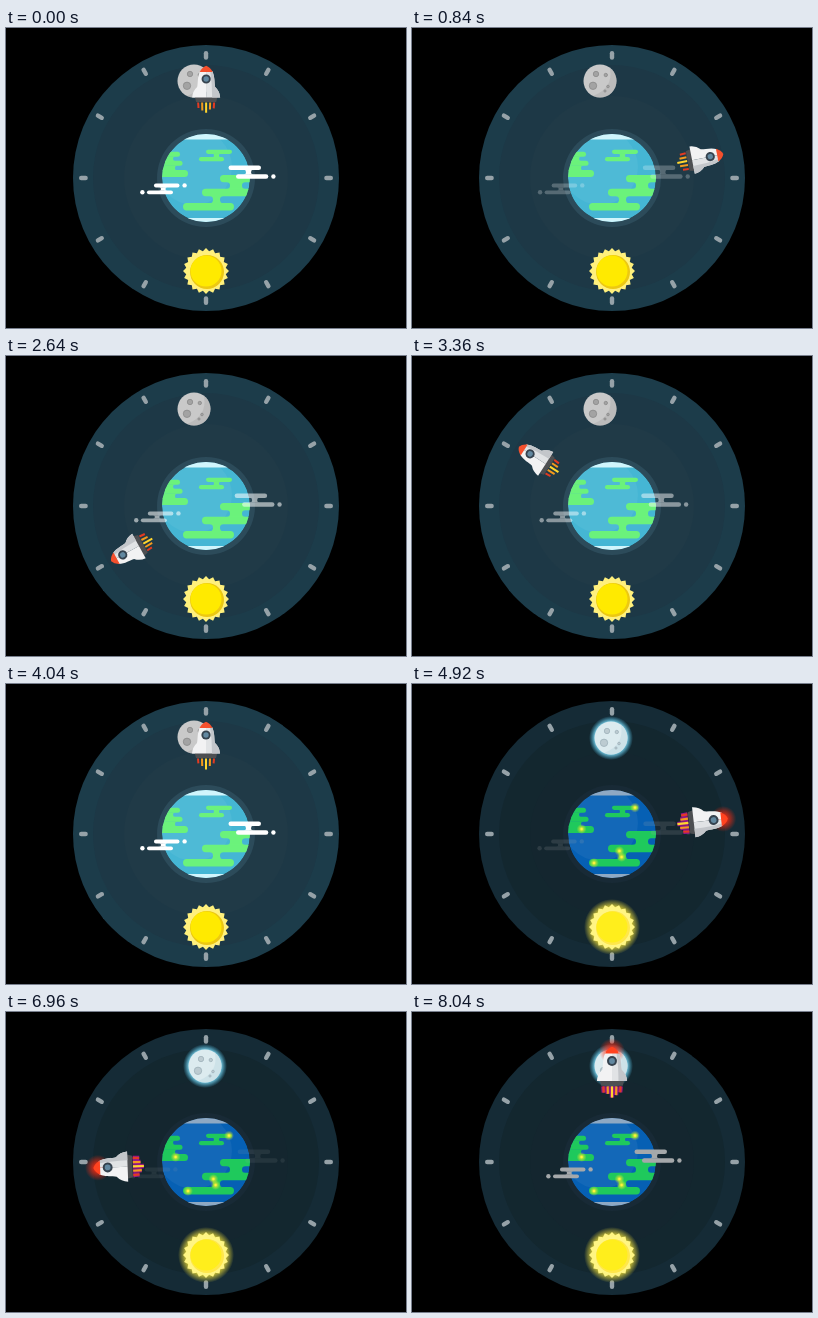
An HTML page for the animation above (8120 ms loop, 400 by 300 pixels).

```html
<!DOCTYPE html>
<html lang="en">
<head>
<meta charset="utf-8">
<title>Day and night orbit</title>
<style>
html, body { margin: 0; width: 100%; height: 100%; overflow: hidden; background: #000; }
svg {
  display: block; width: 100vw; height: 100vh;
  --rim: #1c3c4a; --mid: #1d3846; --core: #203a47; --halo: #2c4b5a;
  --sea: #45b6d4; --land: #6bf27b; --pole: #d0f5fc; --cloud: #fff;
  --ray: #fff07c; --sun: #ffea00; --sunShade: #ecc812;
  --moon: #c9c9c9; --moonShade: #b3b3b3; --crater: #a3a3a3; --craterRim: #8b8b8b;
  --nose: #f4502d;
}
svg.night {
  --rim: #152b36; --mid: #13272f; --core: #14262f; --halo: #182a36;
  --sea: #0660b4; --land: #1fc95c; --pole: #8fa9c3; --cloud: #a5a8aa;
  --ray: #fff583; --sun: #ffee1c; --sunShade: #ffe74a;
  --moon: #dcebef; --moonShade: #c4dde5; --crater: #bccbd1; --craterRim: #9fb2ba;
  --nose: #ff4320;
}
.dark { display: none; }
.night .dark { display: inline; }
.land { fill: var(--land); }
.cloud { fill: var(--cloud); }
</style>
</head>
<body>
<svg id="stage" viewBox="0 0 400 300" xmlns="http://www.w3.org/2000/svg">
  <defs>
    <clipPath id="globe"><circle cx="200" cy="150" r="44"/></clipPath>
    <clipPath id="moonDisc"><circle r="16.5"/></clipPath>
    <radialGradient id="sunGlow">
      <stop offset=".72" stop-color="#ffec3a" stop-opacity=".75"/>
      <stop offset="1" stop-color="#ffec3a" stop-opacity="0"/>
    </radialGradient>
    <radialGradient id="moonGlow">
      <stop offset=".7" stop-color="#8fe6ff" stop-opacity=".95"/>
      <stop offset="1" stop-color="#4cc4ee" stop-opacity="0"/>
    </radialGradient>
    <radialGradient id="noseGlow">
      <stop offset=".3" stop-color="#ff2a10" stop-opacity=".8"/>
      <stop offset="1" stop-color="#ff2a10" stop-opacity="0"/>
    </radialGradient>
    <radialGradient id="cityGlow">
      <stop offset=".15" stop-color="#fff23c"/>
      <stop offset=".4" stop-color="#e4e82c" stop-opacity=".65"/>
      <stop offset="1" stop-color="#c8e82c" stop-opacity="0"/>
    </radialGradient>
  </defs>
  <rect width="400" height="300"/>
  <circle cx="200" cy="150" r="133" fill="var(--rim)"/>
  <circle cx="200" cy="150" r="113" fill="var(--mid)"/>
  <circle cx="200" cy="150" r="82" fill="var(--core)"/>
  <g id="ticks" stroke="#96a2a8" stroke-width="4.4" stroke-linecap="round"/></g>
  <circle cx="200" cy="150" r="49" fill="var(--halo)"/>
  <g clip-path="url(#globe)">
    <circle cx="200" cy="150" r="44" fill="var(--sea)"/>
    <circle cx="188" cy="139" r="38" fill="#fff" opacity=".05"/>
    <path d="M150 100H250V111.5H150ZM150 190H250V200H150Z" fill="var(--pole)"/>
    <g id="lands" class="land"></g>
  </g>
  <g id="cities" class="dark"></g>
  <g id="cloudRight" class="cloud"></g>
  <g id="cloudLeft" class="cloud"></g>
  <g transform="translate(200 243)">
    <circle class="dark" r="28" fill="url(#sunGlow)"/>
    <path id="rays" fill="var(--ray)"/>
    <circle cx="1" cy="1" r="17" fill="var(--sunShade)"/>
    <circle r="15.5" fill="var(--sun)"/>
  </g>
  <g id="moon">
    <circle class="dark" r="22" fill="url(#moonGlow)"/>
    <circle r="16.5" fill="var(--moon)"/>
    <path d="M9-17Q16 8-10 16L0 22L22 14L20-12Z" fill="var(--moonShade)" opacity=".6" clip-path="url(#moonDisc)"/>
    <g id="craters" fill="var(--crater)" stroke="var(--craterRim)" stroke-width=".8"></g>
  </g>
  <g id="rocket">
    <g id="flames" stroke-width="2"></g>
    <circle class="dark" cy="-9" r="12" fill="url(#noseGlow)"/>
    <path d="M-11.5 17H11.5L10 23H-10Z" fill="#4d4f52"/>
    <path d="M-6-8C-9-2-8 4-9 8Q-13.5 12-14 18.5H0V-8Z" fill="#f2f2f3"/>
    <path d="M6-8C9-2 8 4 9 8Q13.5 12 14 18.5H0V-8Z" fill="#e1e3e5"/>
    <path d="M4-8H6C9-2 8 4 9 8Q13.5 12 14 18.5H6Q6 4 4-8Z" fill="#c3c6ca"/>
    <path d="M-6.5-7Q-4-12 0-13.3Q4-12 6.5-7Z" fill="var(--nose)"/>
    <circle r="4.6" fill="#35424e"/>
    <circle r="2.7" fill="#6288a0"/>
  </g>
</svg>
<script>
const LOOP = 8120, NIGHT_AT = 4060, NIGHT_ORIGIN = 4040;
const el = id => document.getElementById(id);
const stage = el('stage');
const clamp = (v, lo, hi) => Math.min(hi, Math.max(lo, v));

const bar = (x1, x2, y, h) =>
  `<rect x="${x1}" y="${y}" width="${x2 - x1}" height="${h}" rx="${h / 2}"/>`;
const neck = (x1, x2, y1, y2) => {
  const r = (y2 - y1) / 2, w = x2 - x1;
  return `<path d="M${x1 - r} ${y1}H${x2 + r}a${r} ${r} 0 0 0 0 ${2 * r}H${x1 - r}a${r} ${r} 0 0 0 0 ${-2 * r}Z"/>`;
};
const dot = (x, y, r, extra = '') => `<circle cx="${x}" cy="${y}" r="${r}" ${extra}/>`;

el('ticks').innerHTML = Array.from({ length: 12 }, (_, i) =>
  `<path d="M200 25.2V29.6" transform="rotate(${i * 30} 200 150)"/>`).join('');

el('lands').innerHTML = [
  bar(200, 226, 121.7, 4.3), neck(208, 213, 125.6, 129.4), bar(193, 218, 129, 4.3),
  bar(150, 174, 123.8, 5), neck(150, 167, 128.4, 133.2), bar(150, 176.5, 132.8, 5),
  neck(150, 169, 137.4, 142.4), bar(150, 182, 142, 7),
  bar(214, 256, 147, 7.2), neck(224, 236, 154, 161), bar(196, 250, 160.8, 7.4),
  neck(207, 214, 168, 175.4), bar(177, 228, 175, 7.4)
].join('');

el('cities').innerHTML = [[223, 123.6], [169.6, 145], [207.4, 167], [209.6, 173], [182, 179]]
  .map(([x, y]) => dot(x, y, 5, 'fill="url(#cityGlow)"')).join('');

el('cloudRight').innerHTML = bar(222.5, 255, 137.4, 4.6) + neck(240, 245, 141.8, 146.6) +
  bar(230, 262.3, 146.3, 4.5) + dot(267.4, 148.5, 2.2);
el('cloudLeft').innerHTML = bar(148, 173.5, 155.6, 3.8) + neck(155, 159.5, 159.2, 162.7) +
  bar(141, 167, 162.4, 3.8) + dot(178.6, 157.4, 2.2) + dot(136.4, 164.2, 2.2);

el('craters').innerHTML = [[-7, 4.8, 3.7], [-4, -7, 2.7], [5.8, -6, 1.7], [8, 5.5, 1.3], [5, 10, 1.1]]
  .map(c => dot(...c)).join('');

const RAYS = 20;
el('rays').setAttribute('d', 'M' + Array.from({ length: RAYS * 2 }, (_, i) => {
  const a = Math.PI * i / RAYS, r = i % 2 ? 20 : 23;
  return `${(r * Math.sin(a)).toFixed(2)} ${(-r * Math.cos(a)).toFixed(2)}`;
}).join('L') + 'Z');

const FLAMES = [[-8, 5, '#e33b22'], [-4, 7, '#f39a1d'], [0, 10, '#ffd62e'], [4, 7, '#f39a1d'], [8, 5, '#e33b22']];

function drawFlames(time, night) {
  const step = Math.floor(time / 80);
  el('flames').innerHTML = FLAMES.map(([x, len, color], i) => {
    const end = 24 + len + .6 * Math.sin(step * 2.1 + i * 1.7);
    const line = (stroke, width) =>
      `<path d="M${x} 23.5L${x * .95} ${end}" stroke="${stroke}" stroke-width="${width}"/>`;
    return (night ? line('#9a1787', 4) : '') + line(color, 2);
  }).join('');
}

function render(time) {
  const night = time >= NIGHT_AT;
  const u = night ? Math.min(1, (time - NIGHT_ORIGIN) / 4000) : Math.min(1, time / 4040);
  stage.classList.toggle('night', night);
  el('moon').setAttribute('transform', `translate(${night ? 199 : 188} ${night ? 54 : 53})`);

  // Clouds drift apart and return twice per turn, fading as they go.
  const drift = 1 - Math.abs(1 - (u * 4) % 2);
  const opacity = clamp(1.45 - 1.45 * drift, 0, 1);
  for (const [id, dir] of [['cloudRight', 1], ['cloudLeft', -1]]) {
    el(id).setAttribute('transform', `translate(${dir * 10 * drift} 0)`);
    el(id).setAttribute('opacity', opacity);
  }

  const angle = 360 * u + 6.5 * Math.sin(Math.PI * u);
  const [radius, scale] = night ? [100.5, 1.08] : [98.5, 1];
  el('rocket').setAttribute('transform',
    `translate(202 149.5) rotate(${angle}) translate(-2 ${-radius}) scale(${scale})`);
  drawFlames(time, night);
}

const start = performance.now();
function tick() {
  render((performance.now() - start) % LOOP);
  requestAnimationFrame(tick);
}
tick();
</script>
</body>
</html>
```
